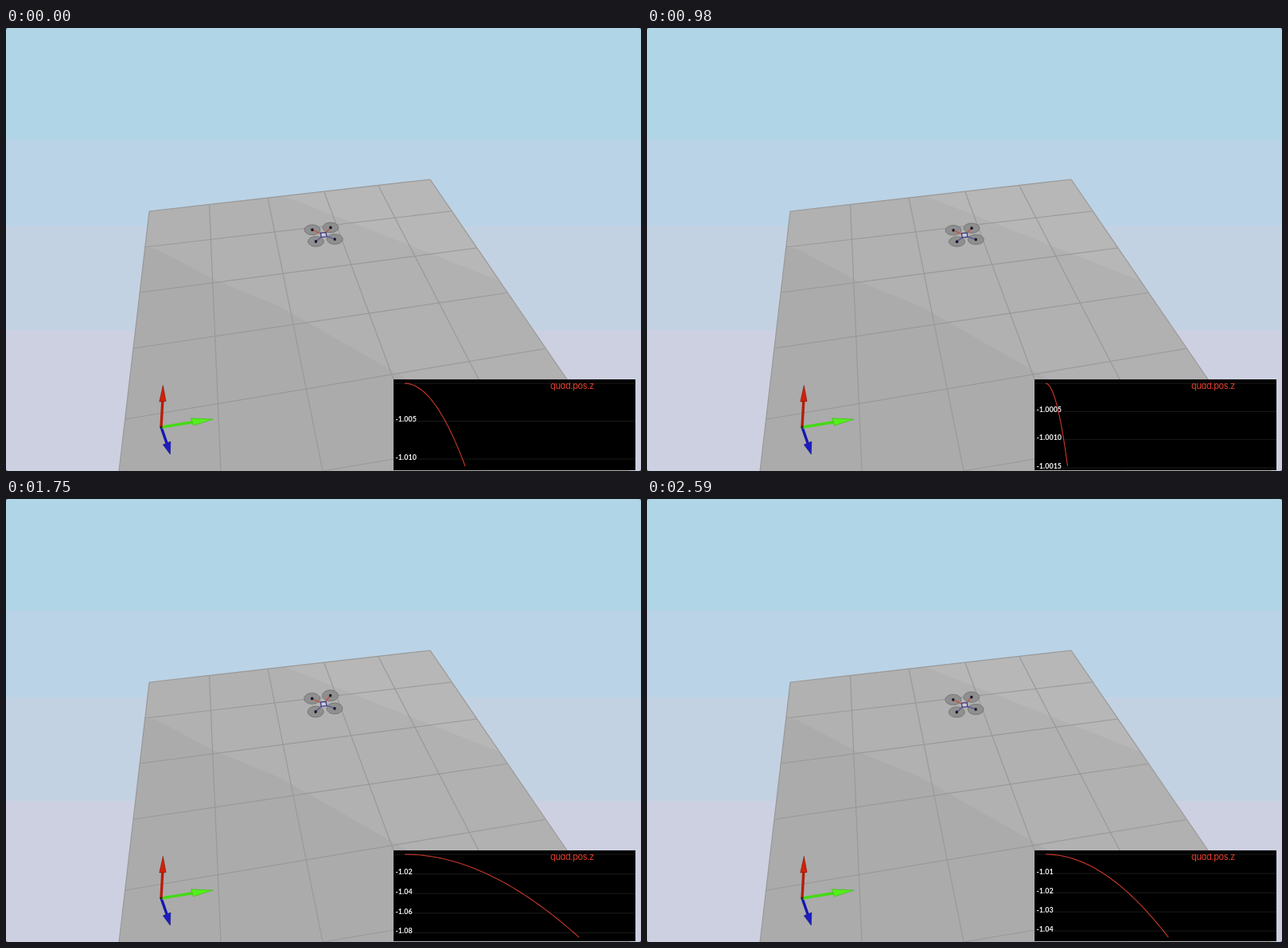
Animation of 798x556 px, one loop 2660 ms. Source, as an HTML page:

```html
<!DOCTYPE html>
<html lang="en">
<head>
<meta charset="utf-8">
<title>Quadcopter height plot</title>
<style>
  html, body { margin: 0; width: 100%; height: 100%; overflow: hidden; }
  svg { display: block; }
  .title { font: 11px Inter, sans-serif; font-feature-settings: "cv11"; letter-spacing: -.35px; fill: #e8412c; }
  .tick { font: 700 9px Lato, sans-serif; fill: #f4f4f4; }
</style>
</head>
<body>
<svg id="stage" width="798" height="556" viewBox="0 0 798 556">
  <defs>
    <clipPath id="ground"><path d="M180 230 533 190 784 556H142Z"/></clipPath>
    <clipPath id="panel"><path d="M487 441H791V555H487Z"/></clipPath>
  </defs>

  <rect width="798" height="556" fill="#b0d5e6"/>
  <rect y="140" width="798" height="416" fill="#bbd3e6"/>
  <rect y="249" width="798" height="307" fill="#c3d2e2"/>
  <rect y="379" width="798" height="177" fill="#cdd0e0"/>

  <g clip-path="url(#ground)">
    <rect x="130" y="180" width="668" height="376" fill="#b1b1b1"/>
    <path d="M335 205 480 262 632 322 720 322 533 180Z" fill="#b7b7b7"/>
    <path d="M130 273 188 277 262 316 345 350 480 427 600 496 600 556H130Z" fill="#ababab"/>
  </g>
  <g id="tiles" fill="none" stroke="#999" stroke-width="1.2"></g>

  <g stroke-width=".6" stroke-linejoin="round">
    <path d="M195 501 202 521" stroke="#1616b4" stroke-width="3.4"/>
    <path d="M197.3 523 206.8 519 206.3 535Z" fill="#1c1cc4" stroke="#101078"/>
    <path d="M195 501 236 494.5" stroke="#46d916" stroke-width="3.6"/>
    <path d="M232.5 489.8 235.5 499 260 491Z" fill="#55ee1c" stroke="#38b512"/>
    <path d="M195 501 196.8 468" stroke="#b81c08" stroke-width="3.4"/>
    <path d="M192.8 469 201 468.5 197.3 448.5Z" fill="#d32008" stroke="#7c1408"/>
    <circle cx="195" cy="501" r="1.6" fill="#222"/>
  </g>

  <g id="drone"></g>

  <g clip-path="url(#panel)">
    <rect x="487" y="441" width="304" height="114"/>
    <g id="grid"></g>
    <path id="curve" fill="none" stroke="#c8392a" stroke-width="1.1"/>
    <text class="title" x="684" y="453">quad.pos.z</text>
  </g>
  <path d="M0 0H2L0 2ZM798 0H796L798 2ZM0 556H2L0 554ZM798 556H796L798 554Z" fill="#6b7478"/>
</svg>
<script>
const $ = id => document.getElementById(id);
const LOOP = 2660, STEP = 70;
const STARTS = [-306, 869, 1970];   // moments when the simulation restarts
const SPEED = 0.2486;               // plot pixels per ms
const PLOT = { x: 501, width: 276, mid: 498, height: 104 };

const line = (x1, y1, x2, y2, extra = "") =>
  `<path d="M${x1} ${y1}L${x2} ${y2}" ${extra}/>`;

$("tiles").innerHTML = [
  [180, 230, 533, 190], [175, 275, 559, 230], [168, 332, 592, 276],
  [160, 402, 629, 332.5], [150, 491, 677, 402.5], [398, 556, 487, 541],
  [180, 230, 142, 556], [255.5, 221.5, 270, 556], [329, 213, 398, 556],
  [400, 206, 487, 441], [468, 198, 594, 441], [533, 190, 705, 441]
].map(p => line(...p)).join("");

// Distance fallen after x plot pixels
const drop = x => (1.96e-6 - 9e-10 * x) * x * x;

function tickStep(span) {
  const base = 10 ** Math.floor(Math.log10(span / 5));
  return [1, 2, 5, 10].map(m => m * base).find(s => span / s < 4.999);
}

function drawPlot(end) {
  const fall = drop(end);
  const span = Math.max(fall, 0.001);
  const scale = PLOT.height / span;
  const yOf = d => PLOT.mid + (d - fall / 2) * scale;

  const step = tickStep(span);
  const digits = Math.ceil(-Math.log10(step) - 1e-6);
  let grid = "";
  for (let i = -2; i < 8; i++) {
    const y = yOf(i * step);
    if (y < 442 || y > 553) continue;
    grid += line(487, y.toFixed(1), 791, y.toFixed(1), 'stroke="#1b1b1b"');
    if (y > 455)
      grid += `<text class="tick" x="489.5" y="${(y + 0.7).toFixed(1)}">-${(1 + i * step).toFixed(digits)}</text>`;
  }
  $("grid").innerHTML = grid;

  const pts = [];
  const n = Math.max(2, Math.ceil(end / 3));
  for (let i = 0; i <= n; i++) {
    const x = end * i / n;
    pts.push((PLOT.x + x).toFixed(2) + " " + yOf(drop(x)).toFixed(2));
  }
  $("curve").setAttribute("d", "M" + pts.join("L"));
}

function drawDrone(end) {
  const k = (end / 219) ** 1.5;
  const ry = 6.2 + 0.7 * k;
  const hub = [399, 260.5 - 2.8 * k];
  const rotors = [
    [385 - 0.4 * k, 254 - 3.6 * k, "#c4563c"],
    [408 - 0.4 * k, 251.4 - 4.7 * k, "#c4563c"],
    [389.5 - 0.4 * k, 268.2 - 1.2 * k, "#5a5a94"],
    [413.3 - 0.3 * k, 265.6 - 2.7 * k, "#5a5a94"]
  ];
  const discs = rotors.map(([x, y]) =>
    `<ellipse cx="${x}" cy="${y}" rx="10" ry="${ry}" fill="#8f8f8f" stroke="#737373" stroke-width=".9"/>`);
  const arms = rotors.map(([x, y, c]) =>
    line(...hub, x, y, `stroke="${c}" stroke-width="1.4"`));
  const motors = rotors.map(([x, y]) =>
    `<ellipse cx="${x}" cy="${y}" rx="1.7" ry="1.9" fill="#16162c"/>`);
  const body = `<path transform="translate(${hub})" d="M-3.6-2.8 3-3.2 4 1.8-2.8 2.6Z" fill="#c9c9dc" stroke="#34347e" stroke-width="1.2"/>`;
  $("drone").innerHTML = [...discs, ...arms, ...motors, body].join("");
}

function draw(ms) {
  const t = Math.floor((ms % LOOP) / STEP) * STEP;
  const start = STARTS.filter(s => s <= t).pop();
  const end = Math.min((t - start) * SPEED, PLOT.width);
  drawPlot(end);
  drawDrone(end);
}

const begin = performance.now();
function tick() {
  draw(performance.now() - begin);
  requestAnimationFrame(tick);
}
tick();
</script>
</body>
</html>
```
